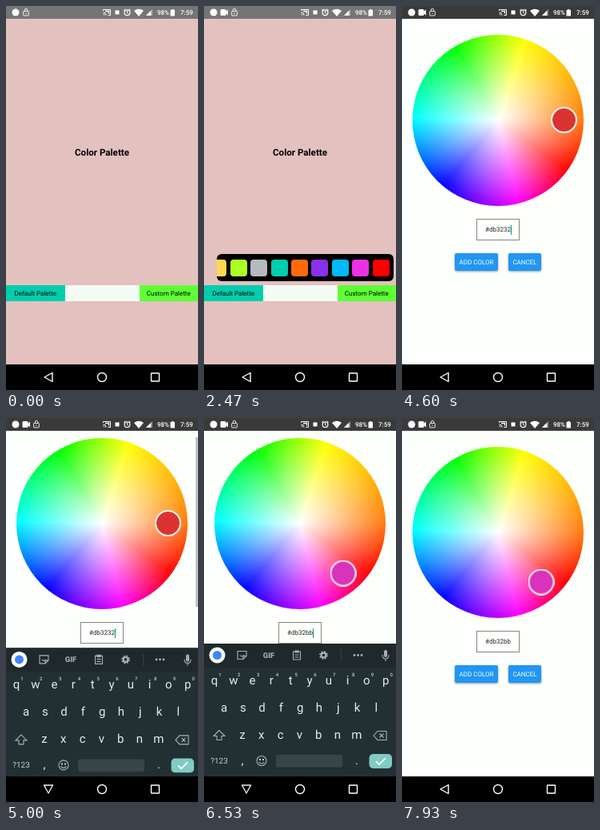
An HTML page for the animation above (8 s loop, 240 by 480 pixels).

```html
<!DOCTYPE html>
<html lang="en">
<head>
<meta charset="utf-8">
<title>Color palette</title>
<style>
html, body { margin: 0; width: 100%; height: 100%; overflow: hidden; }
body { position: relative; background: #e3c1bf; font: 8px Roboto, sans-serif; text-rendering: geometricPrecision; }
body *, .hex::before { box-sizing: border-box; }
div, svg { position: absolute; }
svg { left: 0; top: 0; width: 240px; height: 480px; overflow: hidden; }
.anim, .hex::before { animation: 8s linear infinite; }
.step, .hex::before { animation-timing-function: step-end; }
.center { display: flex; align-items: center; justify-content: center; white-space: pre; }

.title { left: 0; top: 173px; width: 240px; height: 20px; font-size: 11.6px; font-weight: 700; }
.strip { left: 0; top: 349px; width: 240px; height: 20px; background: #f4faf4; }
.tab { top: 0; width: 73.5px; height: 20px; padding-top: 1px; }

.palette { right: 3px; top: 310px; height: 34px; width: 0; overflow: hidden;
  border-radius: 6px; background: #000; animation-name: palette; }
.row { right: 0; top: 0; animation-name: scroll; }
.row div { top: 7px; width: 21px; height: 21px; border-radius: 4px; }

.modal { inset: 0; background: #fdfffc; overflow: hidden; animation-name: modal; }
.page { left: 0; top: 0; width: 240px; height: 480px; animation-name: page; }
.wheel { --reach: 107px; left: 13px; top: 35.5px; width: 214px; height: 214px; border-radius: 50%;
  background: radial-gradient(circle var(--reach), #fff, #fff0),
    conic-gradient(from 90deg, #ff7a10, red 36deg, magenta 76deg, blue 130deg,
      cyan 182deg, lime 240deg, yellow 288deg, #ff7a10); }
.large { --reach: 240px; left: -88px; top: -65px; width: 416px; height: 416px; border-radius: 0; animation-name: early; }
.ready { inset: 0; background: #fdfffc; animation-name: late; }
.thumb { left: 186px; top: 126px; width: 33px; height: 33px; border-radius: 50%;
  border: 2px solid #f6f4f4; animation-name: thumb; }
.hex { left: 93px; top: 266px; width: 54px; height: 27px; border: 1px solid #858585; color: #222; }
.hex::before { content: "#db3232"; animation-name: typing; }
.caret { position: relative; width: 1.5px; height: 12px; margin-right: -1.5px; background: #009688; animation-name: caret; }
.button { top: 309px; height: 22px; border-radius: 2px; background: #2196f3; color: #fff;
  box-shadow: 0 1px 3px #0006; }
.bar { left: 237px; top: 24px; width: 3px; height: 212px; background: #c0c0c0; opacity: 0; animation-name: bar; }

.keys { transform: translateY(170px); animation-name: keys; }
.keys text { text-anchor: middle; fill: #e6eaea; font: 15px Roboto, sans-serif; }
.keys .hint { font-size: 6px; font-weight: 500; fill: #c3cacc; }
.keys .small { font-size: 10px; fill: #c2c9cc; }
.keys .gif { font-size: 9.5px; font-weight: 900; fill: #a3abad; }
.line { fill: none; stroke: #a9b1b4; stroke-width: 1.1; }
.press { fill: #3a4549; opacity: 0; animation-name: press; }
.back { transform-origin: 53px 464px; animation-name: back; }
.status { background: #757575; height: 16px; animation-name: status; }
.status text { font: 500 8px Roboto, sans-serif; fill: #fff; }
.video { opacity: 0; animation-name: video; }
.lock { animation-name: lock; }

@keyframes palette {
  0%, .9% { width: 0; animation-timing-function: cubic-bezier(.45,0,.55,1); }
  7.5%, 30.6% { width: 221px; animation-timing-function: cubic-bezier(.45,0,.55,1); }
  44.1%, 100% { width: 0; }
}
@keyframes scroll {
  0%, 12% { transform: none; animation-timing-function: ease-out; }
  16.6%, 24% { transform: translateX(14px); animation-timing-function: ease-out; }
  29%, 100% { transform: none; }
}
@keyframes modal { 0%, 46.6% { opacity: 0; } 48.2%, 100% { opacity: 1; } }
@keyframes early { 0% { opacity: 1; } 50%, 100% { opacity: 0; } }
@keyframes late { 0% { opacity: 0; } 50%, 100% { opacity: 1; } }
@keyframes page { 0% { transform: none; } 61.6% { transform: translateY(-11px); } 87.5%, 100% { transform: none; } }
@keyframes thumb {
  0%, 79.3% { transform: none; background: #db3232 padding-box; }
  81.2%, 100% { transform: translate(-28.5px, 62.5px); background: #db32bb padding-box; }
}
@keyframes typing {
  0% { content: "#db3232"; } 67.5% { content: "#db323"; } 70.8% { content: "#db32"; }
  75% { content: "#db32b"; } 79.2%, 100% { content: "#db32bb"; }
}
@keyframes caret {
  0% { opacity: 0; } 56.6% { opacity: 1; } 63.2% { opacity: 0; } 67.5% { opacity: 1; } 87%, 100% { opacity: 0; }
}
@keyframes bar { 0%, 61.5% { opacity: 0; } 62%, 70% { opacity: 1; } 74%, 100% { opacity: 0; } }
@keyframes keys {
  0%, 59.5% { transform: translateY(170px); animation-timing-function: ease-out; }
  63%, 86.8% { transform: none; animation-timing-function: ease-in; }
  90%, 100% { transform: translateY(170px); }
}
@keyframes press { 0% { opacity: 0; } 67.4% { opacity: 1; } 69.5% { opacity: 0; } 70.7% { opacity: 1; } 72%, 100% { opacity: 0; } }
@keyframes back { 0%, 60% { transform: none; } 62%, 87% { transform: rotate(-90deg); } 89%, 100% { transform: none; } }
@keyframes status { 0%, 48.5% { background: #757575; } 50%, 100% { background: #3a3a3a; } }
@keyframes video { 0% { opacity: 0; } 4%, 100% { opacity: 1; } }
@keyframes lock { 0% { transform: none; } 4%, 100% { transform: translateX(13px); } }
</style>
</head>
<body>
<div class="title center">Color Palette</div>
<div class="strip">
  <div class="tab center" style="left:0;background:#00ceac">Default Palette</div>
  <div class="tab center" style="right:0;background:#5eff35">Custom Palette</div>
</div>
<div class="palette anim"><div class="row anim"></div></div>

<div class="modal anim">
  <div class="page anim step">
    <div class="wheel large anim step"></div>
    <div class="ready anim step">
      <div class="wheel"></div>
      <div class="thumb anim"></div>
    </div>
    <div class="hex center"><div class="caret anim step" style="order:1"></div></div>
    <div class="button center" style="left:66px;width:54px">ADD COLOR</div>
    <div class="button center" style="left:133px;width:41px">CANCEL</div>
  </div>
  <div class="bar anim"></div>
</div>

<svg class="keys anim" viewBox="0 0 240 480">
  <rect y="282" width="240" height="198" fill="#233033"/>
  <rect y="282" width="240" height="30" fill="#1f282b"/>
  <circle cx="16.5" cy="296.5" r="10" fill="#fff"/>
  <circle cx="16.5" cy="296.5" r="5.5" fill="#4285f4"/>
  <g class="line">
    <path d="M42 291.500h11v6l-4 4h-7zM53 297.500h-4v4M45 296.500q2 3 5 0"/>
    <path d="M111.500 292h9v10h-9zM114 291h4v2h-4zM113.500 296h5M113.500 299h5"/>
    <circle cx="149.500" cy="296.500" r="2.900" stroke-width="2.200"/>
    <circle cx="149.500" cy="296.500" r="4.600" stroke-width="1.500" stroke-dasharray="2 1.613"/>
    <path d="M171.500 289v15" stroke="#374246" stroke-width="1"/>
    <path d="M223 296q0 5 4 5t4-5M227 301v3"/>
  </g>
  <g fill="#a9b1b4">
    <circle cx="188" cy="296.500" r="1.400"/><circle cx="192.500" cy="296.500" r="1.400"/><circle cx="197" cy="296.500" r="1.400"/>
    <rect x="225" y="290" width="4" height="9" rx="2"/>
  </g>
  <text class="gif" x="81" y="300">GIF</text>
  <rect class="press anim step" x="204" y="382" width="33" height="28"/>
  <g class="line" stroke="#c6cccd">
    <path d="M19 390.500l-7 7h4v5h6v-5h4z"/>
    <path d="M212 397l5-5.500h11v11h-11zM219.500 394.500l5 5M224.500 394.500l-5 5"/>
    <circle cx="72" cy="428.500" r="6"/>
    <path d="M68.500 430q3.500 4 7 0"/>
  </g>
  <path d="M69 426h2v2h-2zM73 426h2v2h-2z" fill="#c2c9cc"/>
  <text class="small" x="19" y="432">?123</text>
  <text x="48" y="433">,</text>
  <rect x="90" y="421" width="83" height="15.500" rx="2" fill="#394448"/>
  <text x="191" y="433">.</text>
  <rect x="206.500" y="420" width="28.500" height="18" rx="5" fill="#80cbc4"/>
  <path d="M215 429l4 4 8-8" fill="none" stroke="#fff" stroke-width="1.600"/>
</svg>

<svg viewBox="0 0 240 480">
  <rect y="448" width="240" height="32"/>
  <g fill="none" stroke="#fff" stroke-width="1.400">
    <path class="back anim" d="M48 464l10-5.500v11z" stroke-linejoin="round"/>
    <circle cx="120" cy="464" r="5.500"/>
    <rect x="181.500" y="459" width="10" height="10" rx=".5"/>
  </g>
</svg>

<svg class="status anim" viewBox="0 0 240 16">
  <circle cx="12" cy="8" r="4.500" fill="#fff"/>
  <g class="video anim step" fill="#fff">
    <rect x="20.500" y="4" width="7" height="8" rx="1.500"/>
    <path d="M27 7l3-2.500v7l-3-2.500z"/>
  </g>
  <g class="lock anim step" fill="none" stroke="#fff" stroke-width=".9">
    <rect x="21.700" y="6.500" width="6.600" height="5.500" rx=".6"/>
    <path d="M23.200 6.500v-1.300a1.800 1.800 0 0 1 3.600 0v1.300M25 8.500v1.500"/>
  </g>
  <g fill="none" stroke="#fff">
    <path d="M121.500 6v-1.500h9v7h-3M121.500 8q3.500 0 3.500 3.500M121.500 10q1.500 0 1.500 1.500"/>
    <path d="M124 6.500h4.500v3" stroke-width="1.300"/>
    <circle cx="151.500" cy="8.300" r="3.400" stroke-width="1.200"/>
    <path d="M151.500 6v2.500l1.700 1M147.200 5.500l2-1.700M155.800 5.500l-2-1.700"/>
  </g>
  <g fill="#fff">
    <rect x="136.500" y="5.500" width="5" height="5"/>
    <path d="M160 6q6-4.500 12 0l-6 7z"/>
    <path d="M175 12l8-8v8z" fill-opacity=".45"/>
    <path d="M175 12l6-6v6z"/>
    <path d="M205.500 5h1.500v-1h2.500v1h1.500v7.500h-5.500z"/>
    <text x="189" y="11">98%</text>
    <text x="218" y="11">7:59</text>
  </g>
</svg>

<script>
const row = document.querySelector('.row');
['#f00', '#eb30e6', '#00b9f6', '#8831e8', '#ff6b0a', '#00ceac', '#b5babf', '#acff24', '#ffd84f'].forEach((color, i) => {
  const chip = document.createElement('div');
  chip.style.cssText = `right:${5.5 + i * 25.4}px;background:${color}`;
  row.append(chip);
});

const keys = document.querySelector('.keys');
function label(text, x, y, cls) {
  const el = document.createElementNS(keys.namespaceURI, 'text');
  el.setAttribute('x', x);
  el.setAttribute('y', y);
  if (cls) el.setAttribute('class', cls);
  el.textContent = text;
  keys.append(el);
}
[['qwertyuiop', 13, 333], ['asdfghjkl', 25, 367], ['zxcvbnm', 48, 401]].forEach(([chars, x, y], r) => {
  [...chars].forEach((char, i) => {
    label(char, x + i * 23.8, y);
    if (!r) label((i + 1) % 10, x + 7 + i * 23.8, y - 10.5, 'hint');
  });
});
</script>
</body>
</html>
```
